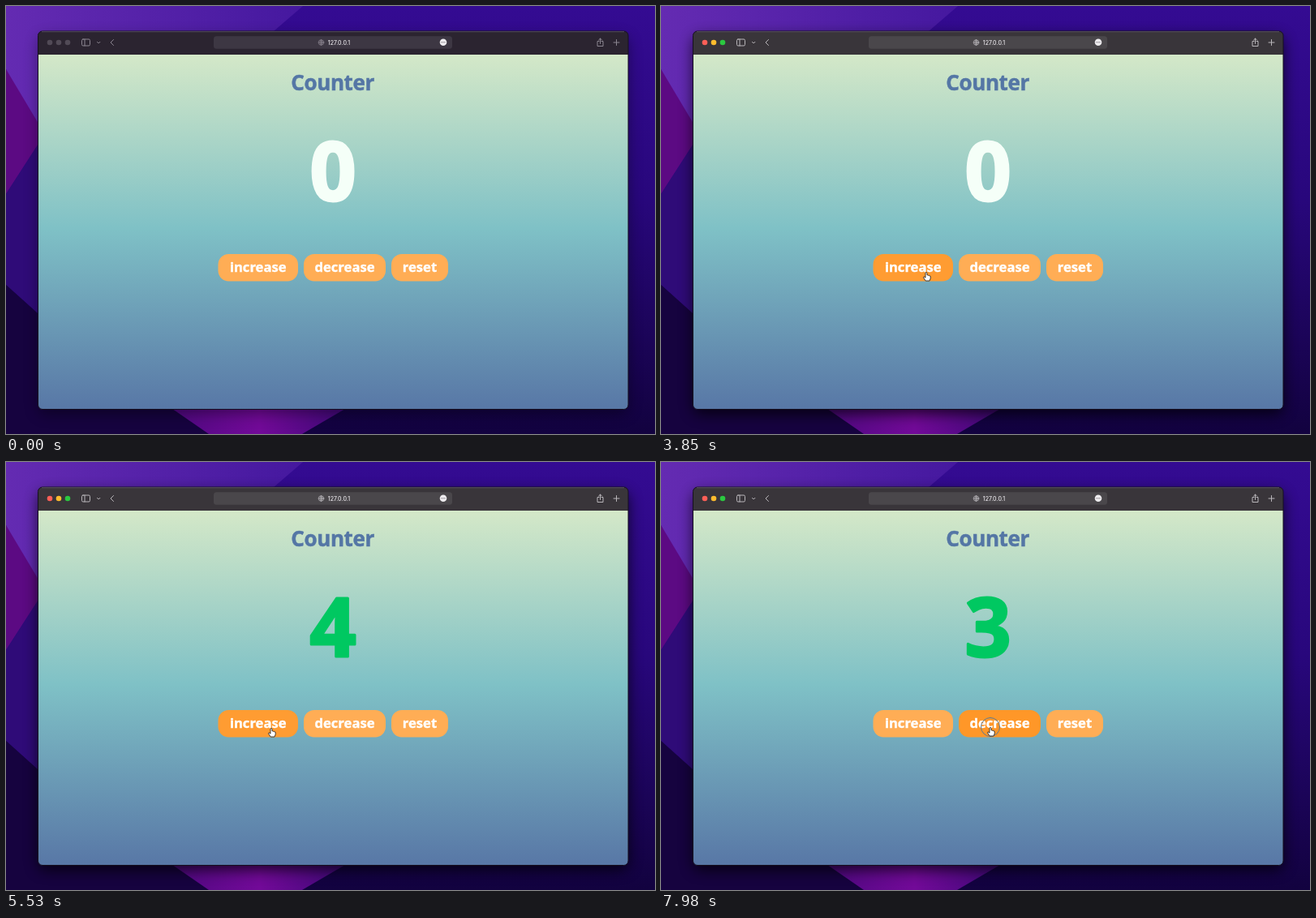
An HTML page for the animation above (8 s loop, 800 by 528 pixels).

```html
<!DOCTYPE html>
<html lang="en">
<head>
<meta charset="utf-8">
<title>Counter</title>
<style>
  html, body { margin: 0; width: 100%; height: 100%; overflow: hidden; background: #1c0755; }
  svg { display: block; width: 800px; height: 528px; }
  text { font-family: "Noto Sans", "Open Sans", sans-serif; font-weight: 700; text-anchor: middle; }
  .label { font-size: 16.6px; fill: #fff; stroke: #fff; stroke-width: .4; }
  .icon { fill: none; stroke: #8b8590; stroke-width: 1; stroke-linecap: round; stroke-linejoin: round; }
  .active .icon { stroke: #b9b6ba; }
  .bar { fill: #2b2430; }
  .active .bar { fill: #39353a; }
  .field { fill: #3d3743; }
  .active .field { fill: #4a474b; }
  .light { fill: #514a56; }
  .active .red { fill: #ff5f57; }
  .active .yellow { fill: #febc2e; }
  .active .green { fill: #2bc840; }
  .shadow { opacity: .4; }
  .active .shadow { opacity: .75; }
</style>
</head>
<body>
<svg id="stage" viewBox="0 0 800 528">
  <defs>
    <linearGradient id="night" x2="0" y2="1">
      <stop stop-color="#340b92"/><stop offset=".45" stop-color="#28077c"/><stop offset="1" stop-color="#12023f"/>
    </linearGradient>
    <linearGradient id="ridge">
      <stop stop-color="#642bb2"/><stop offset="1" stop-color="#45189f"/>
    </linearGradient>
    <linearGradient id="glow">
      <stop stop-color="#4c087e"/><stop offset=".5" stop-color="#720a98"/><stop offset="1" stop-color="#3a0874"/>
    </linearGradient>
    <linearGradient id="page" x2="0" y2="1">
      <stop stop-color="#d4e8c8"/><stop offset=".49" stop-color="#7fc1c6"/><stop offset="1" stop-color="#5877a6"/>
    </linearGradient>
    <filter id="blur" x="-10%" y="-10%" width="120%" height="125%"><feGaussianBlur stdDeviation="9"/></filter>
    <clipPath id="frame"><rect x="39.5" y="31" width="727.5" height="466.5" rx="5.5"/></clipPath>
  </defs>

  <rect width="800" height="528" fill="url(#night)"/>
  <path d="M0 0H366L330 31L40 160L0 78Z" fill="url(#ridge)"/>
  <path d="M0 78L40 145V170L0 232Z" fill="#5c0a83"/>
  <path d="M0 232L40 170V380L0 344Z" fill="#2f0b78"/>
  <path d="M0 344L40 380L205 497L250 528H0Z" fill="#16033f"/>
  <path d="M195 490H430L365 528H250Z" fill="url(#glow)"/>

  <g id="window">
    <rect class="shadow" x="40" y="38" width="727" height="465" rx="8" filter="url(#blur)"/>
    <g clip-path="url(#frame)">
      <rect class="bar" x="39" y="31" width="729" height="29"/>
      <rect x="39" y="60" width="729" height="438" fill="url(#page)"/>
    </g>
    <rect x="39.5" y="31" width="727.5" height="466.5" rx="5.5" fill="none" stroke="#161020" stroke-width="1"/>
    <path d="M44 31.7H762" stroke="#777080" stroke-width=".6"/>
    <circle class="light red" cx="54" cy="45" r="3.3"/>
    <circle class="light yellow" cx="65" cy="45" r="3.3"/>
    <circle class="light green" cx="76" cy="45" r="3.3"/>
    <rect class="field" x="256" y="37.3" width="294" height="15.5" rx="3.5"/>
    <g class="icon">
      <rect x="93.5" y="41" width="10" height="8" rx="1.5"/>
      <path d="M97 41V49M112.5 44.3l1.7 1.7 1.7-1.7M132.5 41.5L129 45l3.5 3.5"/>
      <path d="M731 43.5h-2v6h7v-6h-2M732.5 46.5V40.2M730.5 42l2-2 2 2M749 45h7M752.5 41.5v7"/>
      <g stroke-width=".7">
        <circle cx="388.5" cy="45" r="3.3"/><ellipse cx="388.5" cy="45" rx="1.5" ry="3.3"/>
        <path d="M385.2 45h6.6M388.5 41.7v6.6"/>
      </g>
    </g>
    <text x="410.5" y="47.6" fill="#e8e5ea" style="font:500 7px Inter,sans-serif">127.0.0.1</text>
    <circle cx="539" cy="44.8" r="4.3" fill="#eeecef"/>
    <path d="M536.9 44.8h.1m1.9 0h.1m1.9 0h.1" stroke="#48434c" stroke-width="1.1" stroke-linecap="round"/>
  </g>

  <text x="402.6" y="104" font-size="26" letter-spacing="-.4" fill="#5476a5" stroke="#5476a5" stroke-width=".5">Counter</text>
  <text id="count" x="403" y="240" font-size="100" stroke-width="3" stroke-linejoin="round">0</text>

  <rect id="inc" x="261.5" y="306" width="98.5" height="33.5" rx="13"/>
  <rect id="dec" x="367" y="306" width="101" height="33.5" rx="13"/>
  <rect x="475" y="306" width="70" height="33.5" rx="13" fill="#ffad55"/>
  <text class="label" x="310.7" y="328">increase</text>
  <text class="label" x="417.5" y="328">decrease</text>
  <text class="label" x="510" y="328">reset</text>

  <g id="cursor">
    <circle id="ring" r="11.5" fill="none" stroke="#5d7890" stroke-width="1"/>
    <path id="arrow" d="M0 0V9L2 7.2L3.3 10L4.7 9.4L3.5 6.7H6Z" fill="#080808" stroke="#e8eef0" stroke-width=".6"/>
    <path id="hand" d="M-1 1.2Q0-.5 1 1.2V4Q2.1 3.4 2.6 4.4Q3.7 3.9 4 4.9Q5.2 4.7 5.2 6V8L4 11H-.8L-3.4 7.3Q-3.8 5.7-2.2 6.2L-1 7.2Z"
      fill="#fff" stroke="#171717" stroke-width=".8" stroke-linejoin="round"/>
  </g>
</svg>
<script>
const el = id => document.getElementById(id);
const LOOP = 8000, SHOW = 2240, FOCUS = 3240;
const NORMAL = [255, 173, 85], HOVER = [255, 156, 50], PRESSED = [255, 143, 24];

// Cursor stops: time, x, y
const path = [
  [2240, 425, 505], [2600, 348, 349], [2700, 348, 349], [3080, 327, 328],
  [6060, 327, 328], [6260, 322, 323], [6560, 322, 323], [6950, 406, 327]
];

// Clicks: press time, release time, change of the count
const clicks = [
  [3180, 3290, 0],
  ...[4190, 4560, 4930, 5290, 5640, 5960, 6330].map(t => [t, t + 150, 1]),
  ...[7100, 7310, 7520, 7730, 7940].map(t => [t, t + 90, -1])
];

const clamp = v => Math.max(0, Math.min(1, v));
const ease = v => v * v * (3 - 2 * v);
const mix = (a, b, k) => a.map((v, i) => v + (b[i] - v) * k);
const show = (id, on) => el(id).style.display = on ? '' : 'none';

function cursorAt(t) {
  let pos = path[0].slice(1);
  for (let i = 1; i < path.length; i++) {
    const [start] = path[i - 1], [end, ...to] = path[i];
    if (t > start) pos = mix(path[i - 1].slice(1), to, ease(clamp((t - start) / (end - start))));
  }
  return pos;
}

function paintButton(id, left, right, x, active, held) {
  const over = active && x >= left && x <= right;
  const color = over ? mix(HOVER, PRESSED, held) : NORMAL;
  el(id).setAttribute('fill', `rgb(${color.map(Math.round)})`);
  return over;
}

function draw(now) {
  const t = now % LOOP, active = t >= FOCUS;
  const [x, y] = cursorAt(t);
  const click = clicks.find(([down, up]) => t >= down && t < up);
  const held = click ? clamp((t - click[0]) / 110) : 0;
  const count = clicks.reduce((sum, [, up, step]) => sum + (t >= up ? step : 0), 0);
  const color = count > 0 ? '#00c861' : '#f5fff8';

  el('window').setAttribute('class', active ? 'active' : '');
  el('count').textContent = count;
  el('count').setAttribute('fill', color);
  el('count').setAttribute('stroke', color);

  const overInc = paintButton('inc', 261, 360, x, active, held);
  const overDec = paintButton('dec', 367, 468, x, active, held);
  const hand = overInc || overDec;
  el('cursor').setAttribute('transform', `translate(${x} ${y})`);
  show('cursor', t >= SHOW);
  show('hand', hand);
  show('arrow', !hand);
  show('ring', click);
}

function tick() {
  draw(performance.now());
  requestAnimationFrame(tick);
}
tick();
</script>
</body>
</html>
```
